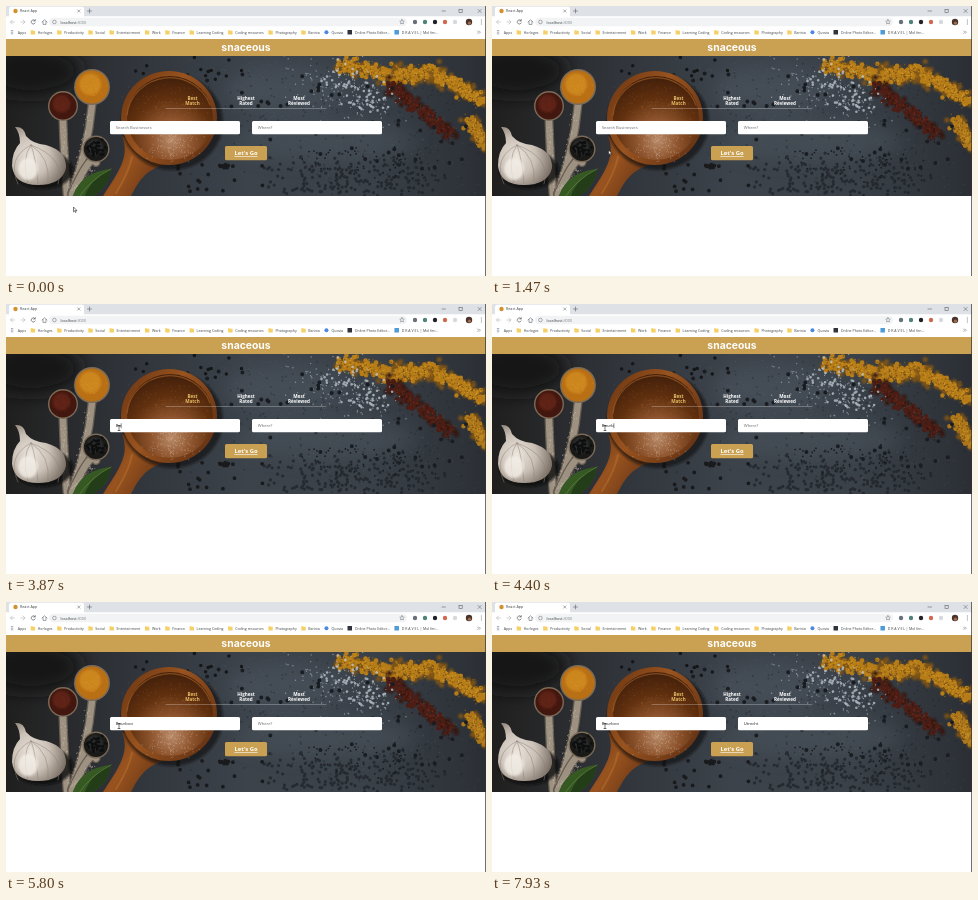
An HTML page for the animation above (8 s loop, 480 by 270 pixels).

```html
<!DOCTYPE html>
<html lang="en">
<head>
<meta charset="utf-8">
<title>Restaurant search</title>
<style>
  html, body { margin: 0; width: 100%; height: 100%; overflow: hidden; background: #fff; }
  svg { display: block; width: 100vw; height: 100vh; }
  text { font-family: "Open Sans", "Noto Sans", sans-serif; white-space: pre; }
</style>
</head>
<body>
<svg id="stage" viewBox="0 0 480 270"></svg>
<script>
const LOOP = 8000;
const GOLD = '#caa052';
const INK = '#5f6368';
const stage = document.getElementById('stage');

let seed = 11;
const random = () => (seed = (seed * 16807) % 2147483647) / 2147483647;
const spread = () => random() + random() + random() - 1.5;

// Markup helpers
const rect = (x, y, w, h, fill, extra = '') =>
  `<rect x="${x}" y="${y}" width="${w}" height="${h}" fill="${fill}" ${extra}/>`;
const oval = (x, y, rx, ry, fill, extra = '') =>
  `<ellipse cx="${x}" cy="${y}" rx="${rx}" ry="${ry}" fill="${fill}" ${extra}/>`;
const dot = (x, y, r, fill, extra) => oval(x, y, r, r, fill, extra);
const shape = (d, fill, extra = '') => `<path d="${d}" fill="${fill}" ${extra}/>`;
const line = (d, color, width, extra = '') =>
  `<path d="${d}" fill="none" stroke="${color}" stroke-width="${width}" stroke-linecap="round" stroke-linejoin="round" ${extra}/>`;
const label = (x, y, size, fill, text, extra = '') =>
  `<text x="${x}" y="${y}" font-size="${size}" fill="${fill}" ${extra}>${text}</text>`;
const gradient = (kind, id, attrs, colors) => `<${kind}Gradient id="${id}" ${attrs}>` +
  colors.map((c, i) => `<stop offset="${i / (colors.length - 1)}" stop-color="${c}"/>`).join('') + `</${kind}Gradient>`;
const blur = (id, amount) =>
  `<filter id="${id}" x="-50%" y="-50%" width="200%" height="200%"><feGaussianBlur stdDeviation="${amount}"/></filter>`;
const SOFT = 'filter="url(#soft)"', FINE = 'filter="url(#fine)"';

// Round grains strewn around the segment between two points
function grains(count, [x1, y1], [x2, y2], width, size, color, extra) {
  let d = '';
  for (let i = 0; i < count; i++) {
    const k = random();
    const x = x1 + (x2 - x1) * k + spread() * width;
    const y = y1 + (y2 - y1) * k + spread() * width;
    d += `M${x.toFixed(1)} ${y.toFixed(1)}h.01`;
  }
  return line(d, color, size, extra);
}

// A heap of powder: a ragged body with darker and lighter crumbs
const powder = (from, to, width, dark, body, light) =>
  grains(60, from, to, width, 5, dark, FINE) +
  grains(95, from, to, width * .8, 4.5, body) +
  grains(60, from, to, width, 1.5, dark) +
  grains(60, from, to, width * .8, 1.5, light, 'opacity=".7"');

const defs = '<defs><clipPath id="hero"><rect y="50" width="480" height="140"/></clipPath>' +
  blur('soft', 9) + blur('fine', 1.3) +
  gradient('linear', 'slate', '', ['#201f1e', '#30343a', '#3c434b', '#3a4149', '#2b2f35']) +
  gradient('linear', 'wood', 'x2="1" y2=".6"', ['#693310', '#98531f', '#6a3615']) +
  gradient('radial', 'bowl', 'cx=".52" cy=".76" r=".72"', ['#b98a68', '#8e552e', '#62310f', '#45210b']) +
  gradient('radial', 'garlic', 'cx=".35" cy=".5" r=".7"', ['#ece6de', '#c9bfb5', '#75695f']) + '</defs>';

const slate = () => rect(0, 50, 480, 140, 'url(#slate)') +
  oval(280, 85, 60, 24, '#4e5761', `opacity=".5" ${SOFT}`) +
  oval(320, 135, 90, 20, '#4c545d', `opacity=".5" ${SOFT}`) +
  oval(25, 65, 50, 25, '#171615', SOFT) +
  grains(250, [215, 70], [470, 170], 65, 1, '#7b858f', 'opacity=".25"') +
  grains(200, [215, 110], [470, 130], 65, 2, '#20242a', 'opacity=".4"');

const spices = () =>
  powder([336, 58], [388, 70], 9, '#7d5315', '#b67c17', '#d49d29') +
  powder([388, 70], [428, 66], 10, '#7d5315', '#b67c17', '#d49d29') +
  powder([428, 68], [476, 94], 9, '#7d5315', '#b67c17', '#d49d29') +
  powder([464, 115], [480, 140], 8, '#7d5315', '#ad7618', '#cd9729') +
  powder([384, 80], [446, 128], 8, '#35140e', '#4c1d14', '#71301f') +
  grains(170, [300, 70], [385, 100], 30, 1.4, '#a8b2bc', 'opacity=".7"') +
  grains(70, [325, 72], [380, 102], 18, 2.6, '#bfc8d0', 'opacity=".75"') +
  grains(190, [270, 172], [425, 174], 21, 3.2, '#1f2328', 'opacity=".75"') +
  grains(70, [300, 150], [430, 165], 18, 1.8, '#191c20') +
  grains(50, [225, 70], [465, 165], 48, 4, '#191c20') +
  grains(16, [100, 60], [230, 66], 14, 3.5, '#151617') +
  grains(25, [160, 178], [250, 165], 17, 3.8, '#191a1c');

const woodenSpoon = () =>
  shape('M116 130C124 150 114 164 97 190H125C132 177 138 164 160 158Z', 'url(#wood)') +
  line('M126 151Q123 166 110 187', '#b4702e', 2, 'opacity=".55"') +
  oval(166, 116, 51, 48, '#11100e', `opacity=".6" ${FINE}`) +
  oval(163, 112, 48, 47, 'url(#wood)') +
  oval(164, 112, 43, 42, 'url(#bowl)') +
  line('M121 109A43 42 0 0 1 204 99', '#a9642a', 1.2, 'opacity=".6"') +
  grains(150, [150, 138], [180, 138], 17, 1, '#d9bda7', 'opacity=".5"') +
  grains(140, [145, 105], [185, 105], 26, 1, '#b06e3b', 'opacity=".35"');

function measure(x, y, r, fill, glow) {
  const foot = 61 + (x - 57) * .15;
  const handle = `M${x} ${y + r}Q${x * .8 + foot * .2} 145 ${foot} 188`;
  return line(handle, '#665c50', 9) + line(handle, '#9d9182', 6.5) +
    grains(50, [x * .9 + 6, y + r + 6], [foot, 186], 3, 1, '#d0c6b6', 'opacity=".6"') +
    dot(x, y, r, '#7b6b58') + dot(x, y, r - 1.4, fill) +
    dot(x - r * .1, y - r * .15, r * .6, glow, `opacity=".6" ${FINE}`) +
    grains(60, [x - r * .3, y], [x + r * .3, y], r * .5, 1, glow, 'opacity=".5"');
}

function garlic() {
  const ridges = [-20, -10, 0, 10, 20].map(dx =>
    line(`M25 139Q${30 + dx * 1.5} 152 ${32 + dx} 178`, '#8d8178', 1, 'opacity=".5"')).join('');
  return oval(37, 164, 30, 19, '#0c0c0c', `opacity=".8" ${FINE}`) +
    shape('M9 121Q18 120 20 130 27 138 40 139 61 145 60 162 56 179 32 179 8 179 6 160 6 145 14 137 14 127 9 121Z', 'url(#garlic)') +
    ridges + oval(22, 163, 10, 11, '#f5f1ea', `opacity=".75" ${FINE}`);
}

const leftStillLife = () =>
  measure(57, 100, 15, '#42170f', '#6f2a1c') +
  measure(86, 81, 18, '#b96f14', '#d99627') +
  measure(90, 143, 13.5, '#191918', '#383735') +
  grains(40, [86, 143], [94, 143], 7, 2.6, '#0d0e0f') +
  shape('M66 192Q74 166 105 163 102 185 80 193Z', '#365923') +
  shape('M78 192Q85 172 105 163 102 185 80 193Z', '#223d18') +
  line('M73 191Q85 173 105 163', '#66853f', .7) + garlic();

// Bookmarks follow each other, so only their names are listed
function bookmarks() {
  const pen = document.createElement('canvas').getContext('2d');
  pen.font = '35.5px "Open Sans", "Noto Sans", sans-serif';
  const folder = x => shape(`M${x - 2} 24.2h1.8l.6.6h2v3.7h-4.4z`, '#f6cf65');
  const square = fill => x => rect(x - 2.2, 24, 4.5, 4.5, fill);
  const apps = x => line(`M${x - 1.5} 24.6h3m-3 1.6h3m-3 1.6h3`, '#718096', 1, 'stroke-dasharray="0 1.5"');
  const folders = ['Horloges', 'Productivity', 'Social', 'Entertainment', 'Work', 'Finance',
    'Learning Coding', 'Coding resources', 'Photography', 'Barista'];
  const items = [['Apps', apps], ...folders.map(name => [name, folder]),
    ['Quovia', x => dot(x, 26.2, 2, '#4e86e5')], ['Online Photo Editor...', square('#30343a')],
    ['D R A V E L | Mol fen...', square('#4f9bd7')]];
  let x = 6.8;
  return items.map(([name, icon]) => {
    const mark = icon(x) + label(x + 5, 27.6, 3.55, '#3c4043', name);
    x += 11.6 + pen.measureText(name).width / 10;
    return mark;
  }).join('');
}

function star(x, y, r) {
  const point = i => {
    const angle = i * Math.PI / 5, reach = i % 2 ? r * .5 : r;
    return `${x + Math.sin(angle) * reach} ${y - Math.cos(angle) * reach}`;
  };
  return line('M' + Array.from({ length: 10 }, (_, i) => point(i)).join('L') + 'Z', INK, .45);
}

const cross = (x, y, r) => line(`M${x - r} ${y - r}l${2 * r} ${2 * r}m0 ${-2 * r}l${-2 * r} ${2 * r}`, INK, .55);
const extensions = ['#686f78', '#4f8278', '#202124', '#cf684c', '#d7dadd'];

const browser = () =>
  rect(0, 0, 480, 10.5, '#dee1e6') + rect(0, 10.5, 480, 23, '#fff') +
  rect(3, .8, 75, 12, '#fff', 'rx="2"') +
  dot(9.5, 5, 2.2, '#d2902e') + label(14, 6.4, 3.7, '#3c4043', 'React App') +
  cross(72.8, 5, 1.2) + line('M81.5 5h4m-2-2v4', INK, .6) +
  line('M436 5h3.5', INK, .6) + rect(453, 3.3, 3.2, 3.2, 'none', `stroke="${INK}" stroke-width=".6"`) + cross(473.6, 5, 1.6) +
  line('M8.5 16h-4l2-2m-2 2l2 2M15 16h4l-2-2m2 2l-2 2', '#b0b3b7', .6) +
  line('M29 14.7a2.1 2.1 0 1 0 .2 2.2M29.2 13.5v1.5h-1.5', INK, .7) +
  line('M36 16l2.5-2.2 2.5 2.2M37 15.6v2.8h3v-2.8', INK, .6) +
  rect(43, 11.8, 358, 8.4, '#f1f3f4', 'rx="4.2"') +
  dot(48.4, 16, 1.8, 'none', `stroke="${INK}" stroke-width=".5"`) +
  label(54.5, 17.5, 3.8, '#3c4043', 'localhost:<tspan fill="#80868b">3000</tspan>') +
  star(396, 16, 2.4) +
  extensions.map((fill, i) => dot(409 + i * 10, 16, 2.2, fill)).join('') +
  dot(463, 16, 3.2, '#49342d') + dot(463.5, 17.2, 1.6, '#a46d4e') +
  line('M475.3 14h.01m-.01 2h.01m-.01 2h.01', INK, 1) +
  bookmarks() +
  line('M471.5 25l1.2 1.2-1.2 1.2m1.7-2.4l1.2 1.2-1.2 1.2', INK, .5);

const centered = (x, y, size, fill, text, extra = '') =>
  label(x, y, size, fill, text, `font-weight="700" text-anchor="middle" ${extra}`);
const sortOption = (x, top, bottom, fill) =>
  centered(x, 94.2, 4.6, fill, top) + centered(x, 99.4, 4.6, fill, bottom);

const fields = [
  { id: 'term', x: 104, hint: 'Search Businesses', value: 'Bourbon', focus: 2500, start: 3500, interval: 210 },
  { id: 'place', x: 246, hint: 'Where?', value: 'Utrecht', focus: 4900, start: 6400, interval: 160 }
];

stage.innerHTML = defs + browser() +
  rect(0, 33, 480, 17, GOLD) +
  centered(240, 45.1, 10.4, '#fff', 'snaceous', 'style="font-family:Inter,sans-serif"') +
  `<g clip-path="url(#hero)">${slate()}${spices()}${woodenSpoon()}${leftStillLife()}</g>` +
  sortOption(186.5, 'Best', 'Match', '#e6bd67') +
  sortOption(240, 'Highest', 'Rated', '#fff') +
  sortOption(293, 'Most', 'Reviewed', '#fff') +
  line('M160 102.5H320', '#fff', .5, 'opacity=".5"') +
  fields.map(f => rect(f.x, 115, 130, 13.2, '#fff', 'rx="1.5"') +
    label(f.x + 5.8, 123.2, 4.2, '', f.hint, `id="${f.id}"`)).join('') +
  rect(219, 140, 42, 14.3, GOLD, 'rx="1.5"') +
  centered(240, 149.3, 5.9, '#fff', "Let's Go", 'text-decoration="underline"') +
  rect(479.3, 0, .7, 270, '#333') +
  rect(0, 119.3, .5, 5, '#111', 'id="caret"') +
  shape('M0 0V4.8L1.1 3.8 1.9 5.5 2.7 5.1 1.9 3.5H3.4Z', '#fff', 'id="arrow" stroke="#111" stroke-width=".55"') +
  line('M-1-2.5H1M0-2.5V2.5M-1 2.5H1', '#222', .6, 'id="beam"');

const byId = id => document.getElementById(id);
const caret = byId('caret'), arrow = byId('arrow'), beam = byId('beam');
const show = (node, on) => node.setAttribute('visibility', on ? 'visible' : 'hidden');
const clamp = (value, low, high) => Math.min(high, Math.max(low, value));

function ease(t, start, end) {
  const k = clamp((t - start) / (end - start), 0, 1);
  return k * k * (3 - 2 * k);
}

// The pointer rises into the photo, then settles in the first field
function pointerAt(t) {
  const rise = ease(t, 700, 1420), settle = ease(t, 1600, 2250);
  return [67.5 + 49 * rise - 3.5 * settle, 201 - 57 * rise - 20 * settle];
}

function render(t) {
  const active = fields.filter(f => t >= f.focus).pop();
  show(caret, false);
  for (const f of fields) {
    const node = byId(f.id);
    const typed = clamp(Math.floor((t - f.start) / f.interval) + 1, 0, f.value.length);
    node.textContent = typed ? f.value.slice(0, typed) : f.hint;
    node.setAttribute('fill', typed ? '#222' : '#6c6c6c');
    if (f !== active) continue;
    const lastInput = typed ? f.start + (typed - 1) * f.interval : f.focus;
    caret.setAttribute('x', f.x + 5.6 + (typed ? node.getComputedTextLength() : 0));
    show(caret, Math.floor((t - lastInput) / 530) % 2 === 0);
  }

  const [x, y] = pointerAt(t);
  const overField = y > 115 && y < 128.2 && x > 104 && x < 234;
  for (const node of [arrow, beam]) node.setAttribute('transform', `translate(${x} ${y})`);
  show(arrow, !overField);
  show(beam, overField);
}

function tick() {
  render(performance.now() % LOOP);
  requestAnimationFrame(tick);
}
tick();
</script>
</body>
</html>
```
